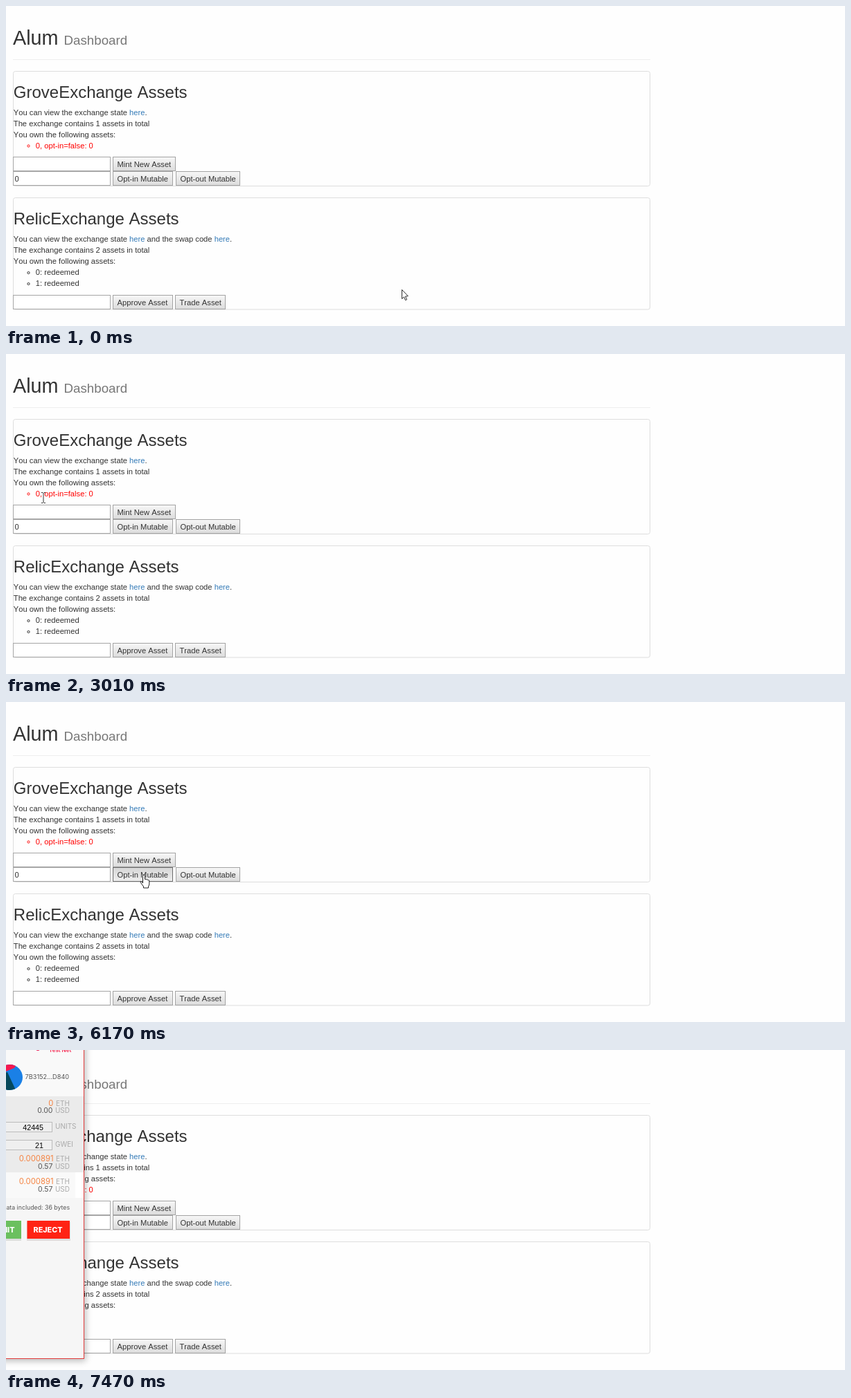
An HTML page for the animation above (8 s loop, 1211x463 px).

```html
<!DOCTYPE html>
<html lang="en">
<head>
<meta charset="utf-8">
<title>Dashboard</title>
<style>
  html, body { margin: 0; width: 100%; height: 100%; overflow: hidden; background: #fefefe; }
  svg { position: absolute; left: 0; top: 0; overflow: visible; }
  .page { font: 11.2px "Liberation Sans", Arial, sans-serif; font-kerning: none; fill: #333; }
  .h1 { font-size: 28.8px; }
  .h2 { font-size: 24px; }
  .small { font-size: 18.72px; fill: #777; }
  .link { fill: #337ab7; }
  .red { fill: #f00; }
  .dot { fill: none; stroke: #333; }
  .red.dot { fill: none; stroke: #f00; }
  .panel { fill: none; stroke: #ddd; }
  .field { fill: #fff; stroke: #a6a6a6; }
  .btn rect { fill: url(#face); stroke: #a3a3a3; }
  .btn.hover rect { stroke: #6c6c6c; }
  .btn.down rect { fill: url(#pressed); }
  #popup {
    position: absolute; left: -237px; top: -103px; width: 348px; height: 548px;
    border: 1px solid #e23b3b; background: #fff;
    box-shadow: 1px 2px 9px 1px rgba(0, 0, 0, .27);
  }
  #popup svg { left: 236px; top: 102px; }
  .wallet { font: 9.6px Inter, "Open Sans", sans-serif; fill: #555; }
  .eth { font-size: 11.3px; fill: #f58443; }
  .usd { font-size: 10.5px; }
  .unit { font-size: 10px; fill: #aaa; }
  .end { text-anchor: end; }
  .entry { font: 10.7px "Liberation Sans", Arial, sans-serif; fill: #000; }
  .label { font-size: 10.8px; font-weight: 800; fill: #fff; }
</style>
</head>
<body>
<svg class="page" id="page" width="1211" height="463">
  <defs>
    <linearGradient id="face" x2="0" y2="1">
      <stop stop-color="#f7f7f7"/><stop offset="1" stop-color="#dcdcdc"/>
    </linearGradient>
    <linearGradient id="pressed" x2="0" y2="1">
      <stop stop-color="#d6d6d6"/><stop offset="1" stop-color="#eee"/>
    </linearGradient>
  </defs>
  <text class="h1" x="10" y="56">Alum</text>
  <text class="small" x="83.6" y="56">Dashboard</text>
  <path d="M10 77.5H930" stroke="#eee"/>

  <rect class="panel" x="10.5" y="94.5" width="919" height="166" rx="3"/>
  <text class="h2" x="10.8" y="133">GroveExchange Assets</text>
  <text x="10.8" y="158">You can view the exchange state <tspan class="link">here</tspan>.</text>
  <text x="10.8" y="174">The exchange contains 1 assets in total</text>
  <text x="10.8" y="190">You own the following assets:</text>
  <circle class="red dot" cx="32.5" cy="202.5" r="1.6"/>
  <text class="red" x="42.8" y="206">0, opt-in=false: 0</text>

  <rect class="panel" x="10.5" y="277.5" width="919" height="161.5" rx="3"/>
  <text class="h2" x="10.8" y="316">RelicExchange Assets</text>
  <text x="10.8" y="341">You can view the exchange state <tspan class="link">here</tspan> and the swap code <tspan class="link">here</tspan>.</text>
  <text x="10.8" y="357">The exchange contains 2 assets in total</text>
  <text x="10.8" y="373">You own the following assets:</text>
  <circle class="dot" cx="32.5" cy="386" r="1.6"/>
  <text x="42.8" y="389">0: redeemed</text>
  <circle class="dot" cx="32.5" cy="402" r="1.6"/>
  <text x="42.8" y="405">1: redeemed</text>

  <rect class="field" x="10.5" y="218.5" width="140" height="20"/>
  <rect class="field" x="10.5" y="239.5" width="140" height="20"/>
  <rect class="field" x="10.5" y="418.5" width="140" height="20"/>
  <text x="12.4" y="254">0</text>
</svg>

<div id="popup">
  <svg class="wallet" id="wallet" width="112" height="446">
    <clipPath id="view"><rect width="112" height="446"/></clipPath>
    <clipPath id="disc"><circle cx="5.5" cy="39.5" r="18.5"/></clipPath>
    <g clip-path="url(#view)" id="sheet">
      <rect width="112" height="446" fill="#f6f6f6"/>
      <rect width="112" height="67" fill="#f9f9f9"/>
      <rect y="67" width="112" height="110" fill="#ebebeb"/>
      <rect y="177" width="112" height="37" fill="#f9f9f9"/>
      <rect x="100" y="177" width="12" height="37" fill="#fff"/>
      <circle cx="46" cy="-2" r="3" fill="#e91550"/>
      <text x="62" y="2.5" font-size="8" font-weight="600" fill="#f5264f">Test Net</text>
      <g clip-path="url(#disc)">
        <rect x="-15" y="20" width="40" height="40" fill="#1a80e6"/>
        <path d="M-15 20H16L12 26L-15 37Z" fill="#f5174f"/>
        <path d="M-15 38L2 32L15 60H-15Z" fill="#04485c"/>
      </g>
      <text x="27.5" y="42" font-size="9.2">7B3152...D840</text>
      <rect x="-9.5" y="104.5" width="76" height="14" fill="#efefef" stroke="#bbb"/>
      <rect x="-9.5" y="130.5" width="76" height="14" fill="#efefef" stroke="#bbb"/>
      <text class="entry end" x="54" y="116">42445</text>
      <text class="entry end" x="54" y="141.5">21</text>
      <text class="unit" x="71" y="114">UNITS</text>
      <text class="unit" x="71" y="140">GWEI</text>
      <text class="end" x="92" y="230.5" font-size="8.75">data included: 36 bytes</text>
      <rect x="-40" y="249" width="62" height="27" fill="#000" opacity=".1"/>
      <rect x="-40" y="247" width="62" height="26" fill="#6bc05f"/>
      <text class="label end" x="12.5" y="264">SUBMIT</text>
      <rect x="30" y="249" width="63" height="27" fill="#000" opacity=".1"/>
      <rect x="30.5" y="247" width="61.5" height="26" fill="#ff2314"/>
      <text class="label" x="39.5" y="264">REJECT</text>
    </g>
  </svg>
</div>

<svg width="1211" height="463" id="pointer">
  <path id="arrow" d="M.5 .5V13.6L3.5 10.9L5.5 15.7L7.5 14.8L5.5 10.1L9.3 9.7Z" fill="#fff" stroke="#222" stroke-width=".95"/>
  <path id="hand" d="M-1.5 12V1.5q0-1.5 1.5-1.5t1.5 1.5V6.5q2.4-.8 2.6.6 2-.6 2.2.7 1.4-.3 1.5 1.2V13q0 2-1.3 4v2h-7v-2l-4-5.5q-1-2 .5-2.2Z" fill="#fff" stroke="#222"/>
  <path id="beam" d="M-3 -7.5H-1L0 -6.5L1 -7.5H3M0 -6.5V6.5M-3 7.5H-1L0 6.5L1 7.5H3" fill="none" stroke="#333"/>
</svg>

<script>
const $ = id => document.getElementById(id);
const LOOP = 8000;

function add(parent, tag, attrs, text) {
  const el = document.createElementNS('http://www.w3.org/2000/svg', tag);
  for (const k in attrs) el.setAttribute(k, attrs[k]);
  if (text) el.textContent = text;
  parent.append(el);
  return el;
}

function button(x, y, w, label) {
  const el = add($('page'), 'g', { class: 'btn' });
  add(el, 'rect', { x: x + .5, y: y + .5, width: w - 1, height: 20 });
  add(el, 'text', { x: x + 6.5, y: y + 15 }, label);
  return { el, x, y, w, h: 21 };
}

const buttons = [
  button(154, 218, 91, 'Mint New Asset'),
  button(154, 239, 87, 'Opt-in Mutable'),
  button(245, 239, 93, 'Opt-out Mutable'),
  button(154, 418, 87, 'Approve Asset'),
  button(244, 418, 73, 'Trade Asset')
];

// Regions that show a text caret
const textAreas = [
  { x: 43, y: 194, w: 84, h: 16 },
  { x: 11, y: 218, w: 140, h: 42 }
];

function amount(y, eth, usd) {
  const line = (cls, x, y, s) => add($('sheet'), 'text', { class: cls + ' end', x, y }, s);
  line('eth', 68.5, y, eth);
  line('unit', 92, y, 'ETH');
  line('usd', 67.5, y + 10.5, usd);
  line('unit', 92, y + 10.5, 'USD');
}
amount(80.5, '0', '0.00');
amount(161, '0.000891', '0.57');
amount(194, '0.000891', '0.57');

// Pointer moves: start, end, steps, then quadratic curve points
const moves = [
  { a: 60, b: 140, n: 3, p: [[571, 410], [561, 374], [551, 338]] },
  { a: 1920, b: 2720, n: 15, p: [[551, 338], [382, 350], [110, 269]] },
  { a: 2770, b: 3010, n: 5, p: [[110, 269], [75, 235], [54, 208]] },
  { a: 3380, b: 3850, n: 9, p: [[54, 208], [97, 203], [140, 201]] },
  { a: 4470, b: 5050, n: 11, p: [[140, 201], [76, 275], [199, 250]] },
  { a: 7270, b: 7470, n: 5, p: [[199, 250], [150, 200], [-30, 250]] }
];

function pointerAt(t) {
  let m = moves[0], e = 0;
  for (const next of moves) {
    if (t < next.a) break;
    m = next;
    const step = Math.floor((t - m.a) / (m.b - m.a) * (m.n - 1) + 1e-6);
    e = Math.min(1, (step + 1) / m.n);
  }
  const [p, c, q] = m.p;
  return [0, 1].map(i => p[i] * (1 - e) ** 2 + 2 * c[i] * e * (1 - e) + q[i] * e * e);
}

// Popup opening: time, opacity, scale
const opening = [
  [6530, .2, .962], [6590, .5, .979], [6640, .76, .989],
  [6700, .92, .996], [6730, .98, .999], [6780, 1, 1]
];

function draw(t) {
  const [x, y] = pointerAt(t);
  const inside = r => x >= r.x && x < r.x + r.w && y >= r.y && y < r.y + r.h;
  const state = opening.filter(s => t >= s[0]).pop();
  const covered = state && x < 113;

  let kind = 'arrow';
  if (!covered && textAreas.some(inside)) kind = 'beam';
  for (const b of buttons) {
    const hover = !covered && inside(b);
    if (hover) kind = 'hand';
    b.el.classList.toggle('hover', hover);
    b.el.classList.toggle('down', hover && t >= 6170 && t < 6350);
  }
  for (const id of ['arrow', 'hand', 'beam']) {
    $(id).style.display = id === kind ? '' : 'none';
    $(id).setAttribute('transform', `translate(${Math.round(x)} ${Math.round(y)})`);
  }

  const popup = $('popup');
  popup.style.display = state ? '' : 'none';
  if (state) {
    popup.style.opacity = state[1];
    popup.style.transform = state[2] < 1 ? `scale(${state[2]})` : 'none';
  }
  $('wallet').style.display = t >= 7270 ? '' : 'none';
}

const start = performance.now();
function tick() {
  draw((performance.now() - start) % LOOP);
  requestAnimationFrame(tick);
}
tick();
</script>
</body>
</html>
```
